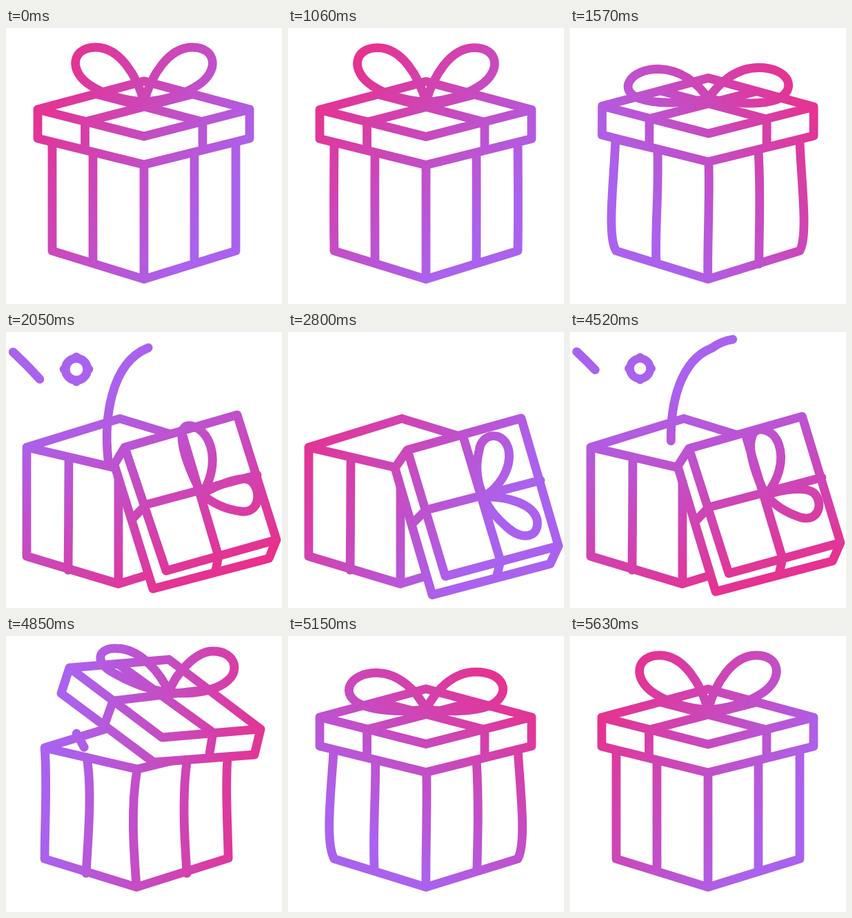
Write an HTML page without scripts that moves like this. It is 400 px wide and 400 px high and loops after 5.66 s.

```html
<!DOCTYPE html>
<html lang="en">
<head>
<meta charset="utf-8">
<title>Gift box</title>
<style>
html, body { margin: 0; width: 100%; height: 100%; overflow: hidden; background: #fff; }
svg { display: block; width: 100%; height: 100%; }
.ink * {
  fill: none; stroke: #fff; stroke-width: 12.8; stroke-linecap: round; stroke-linejoin: round;
}
/* Opens, then plays backwards to close; the delay places the closed pause at load. */
.ink, .ink * {
  animation: 2830ms linear -5175ms infinite alternate both;
}
#box { animation-name: slide; }
#body { animation-name: body; }
#lid { fill: #000; animation-name: lid; }
#bow { animation-name: bow; }
#streak { animation-name: streak; }
#streamer { animation-name: streamer; }
#ring { animation-name: ring; }
#ring * { animation: none; }
#ring .nub { fill: #fff; stroke: none; }

@keyframes slide {
  0%, 38.3% { transform: translate(0, 0); }
  45.8% { transform: translate(-11px, 0); }
  55.3%, 100% { transform: translate(-37px, 1.5px); }
}

@keyframes body {
  0%, 18.2% {
    animation-timing-function: ease-in-out;
    d: path("M67 161L200 193L333 161L200 121Z M67 161C67 215 67 270 67 323L200 364L333 323C333 270 333 215 333 161 M200 193C200 250 200 310 200 364 M126 176C126 230 126 290 126 339 M273 176C273 230 273 290 273 339");
  }
  29.9% {
    animation-timing-function: ease-in-out;
    d: path("M67 167L200 199L333 167L200 127Z M67 167C61 220 53 290 67 323L200 364L333 323C347 290 339 220 333 167 M200 199C200 250 200 310 200 364 M126 182C123 235 121 290 126 339 M273 182C276 235 278 290 273 339");
  }
  38.3% {
    d: path("M66 161L201 193L334 161L200 121Z M66 161C64 220 53 302 67 323L200 364L333 323C346 302 335 220 333 161 M201 193C203 250 199 310 200 364 M127 176C129 240 123 290 125 340 M273 176C277 240 274 290 274 342");
  }
  45.8% {
    d: path("M67 162L201 193L333 161L200 121Z M67 162C71 215 67 270 67 323L200 364L333 322C332 270 328 215 333 161 M201 193C191 250 196 310 200 364 M128 176C136 225 130 290 127 344 M274 176C265 230 270 300 273 344");
  }
  55.3%, 100% {
    d: path("M67 165.5L200 196.5L333 164L202 124Z M67 165.5C67 215 67 270 67 323.5L200 363.5L333 323C333 270 333 215 333 164 M200 196.5C200 250 200 310 200 363.5 M128 181C128 230 127.5 290 127 343.5 M273 181C273 230 273 290 273 343");
  }
}

/* Every part of the lid runs clockwise so its fill stays solid. */
@keyframes lid {
  0%, 18.2% {
    animation-timing-function: ease-in-out;
    d: path("M46 118L200 77L353 118L353 160L200 198L46 160Z M353 118L200 157L46 118 M114.5 175L114.5 136L270 96 M132 96L285 136L285 175");
  }
  29.9% {
    animation-timing-function: ease-in-out;
    d: path("M46 126L200 85L353 126L353 168L200 206L46 168Z M353 126L200 165L46 126 M114.5 183L114.5 144L270 104 M132 104L285 144L285 183");
  }
  38.3% {
    animation-timing-function: cubic-bezier(.3, .4, .7, 1);
    d: path("M46 114L200 73L353 114L353 156L200 194L46 156Z M353 114L200 153L46 114 M114.5 171L114.5 132L270 92 M132 92L285 132L285 171");
  }
  45.8% {
    animation-timing-function: cubic-bezier(.4, .2, .7, .9);
    d: path("M92 46L236 34L369 135L360 172L214 183L80 83Z M369 135L226 147L92 46 M143 128L155 94L297 77 M163 41L300 140L295 170");
  }
  55.3% {
    animation-timing-function: ease-out;
    d: path("M172 167L335 120L392 301L381 328L213 372L157 192Z M392 301L232 346L172 167 M183 271L203 250L364 207 M254 143L308 325L304 345");
  }
  61.7%, 100% {
    d: path("M173 171L338 125L392 310L380 336L209 381L155 197Z M392 310L228 354L173 171 M183 275L200 258L366 215 M254 152L308 332L303 352");
  }
}

@keyframes bow {
  0%, 18.2% {
    animation-timing-function: ease-in-out;
    d: path("M200 107C190 70 165 28 130 28C95 28 90 62 122 83C145 98 175 105 200 107 M200 107C210 70 235 28 270 28C305 28 310 62 278 83C255 98 225 105 200 107");
  }
  29.9% {
    animation-timing-function: ease-in-out;
    d: path("M200 115C190 78 165 38 130 38C95 38 88 70 120 91C143 106 175 113 200 115 M200 115C210 78 235 38 270 38C305 38 312 70 280 91C257 106 225 113 200 115");
  }
  38.3% {
    animation-timing-function: cubic-bezier(.3, .4, .7, 1);
    d: path("M200 103C185 80 160 61 128 60C85 60 68 92 100 103C130 113 170 108 200 103 M200 103C215 80 240 58 273 58C318 58 330 90 300 104C272 114 230 108 200 103");
  }
  45.8% {
    animation-timing-function: cubic-bezier(.4, .2, .7, .9);
    d: path("M236 82C225 55 195 18 160 18C135 17 128 35 150 50C175 65 205 78 236 82 M236 82C245 55 275 22 300 22C330 22 340 48 322 64C305 80 270 85 236 82");
  }
  55.3% {
    animation-timing-function: cubic-bezier(.3, 1.5, .6, 1);
    d: path("M284 235C300 210 304 180 293 157C283 137 262 130 257 140C248 160 270 210 284 235 M284 235C305 222 335 210 350 213C369 219 373 262 342 260C315 257 298 247 284 235");
  }
  81.8%, 100% {
    d: path("M284 239C305 225 324 200 320 172C314 142 280 145 277 172C271 195 274 220 284 239 M284 239C315 238 355 248 361 272C365 298 340 302 320 285C300 268 290 255 284 239");
  }
}

/* Confetti: dashes that run along their paths. */
@keyframes streak {
  0%, 43.6% { opacity: 0; stroke-dasharray: .1 200; stroke-dashoffset: 0; }
  43.7% { opacity: 1; stroke-dasharray: .1 200; stroke-dashoffset: 0; }
  45.8% { stroke-dasharray: 12 200; stroke-dashoffset: -14; }
  55.3% { stroke-dasharray: 28 200; stroke-dashoffset: -70.5; }
  61.7% { opacity: 1; stroke-dasharray: .1 200; stroke-dashoffset: -99.5; }
  61.8%, 100% { opacity: 0; stroke-dasharray: .1 200; stroke-dashoffset: -99.5; }
}

@keyframes streamer {
  0%, 46.8% { opacity: 0; stroke-dasharray: .1 200; stroke-dashoffset: 0; }
  46.9% { opacity: 1; stroke-dasharray: .1 200; stroke-dashoffset: 0; }
  55.3% { stroke-dasharray: 54.5 200; stroke-dashoffset: 0; }
  64.8% { stroke-dasharray: 62 200; stroke-dashoffset: -37; animation-timing-function: ease-out; }
  78.6%, 81.2% { opacity: 1; stroke-dasharray: .1 200; stroke-dashoffset: -99.8; }
  81.3%, 100% { opacity: 0; stroke-dasharray: .1 200; stroke-dashoffset: -99.8; }
}

@keyframes ring {
  0%, 46.8% { transform: translate(135px, 155px) scale(0); animation-timing-function: ease-out; }
  55.3% { transform: translate(102px, 54px) scale(1); animation-timing-function: ease-in; }
  64.8%, 100% { transform: translate(96px, 40px) scale(0); }
}
</style>
</head>
<body>
<svg viewBox="0 0 400 400">
  <defs>
    <linearGradient id="tint" gradientUnits="userSpaceOnUse" x1="390" y1="200" x2="75" y2="200">
      <stop offset="0" stop-color="#e8308c"/>
      <stop offset="1" stop-color="#aa62ee"/>
      <animateTransform attributeName="gradientTransform" type="rotate" dur="5.66s" repeatCount="indefinite"
        values="-148 200 200;-148 200 200;212 200 200;212 200 200;-148 200 200;-148 200 200"
        keyTimes="0;.1767;.4947;.6767;.9947;1"/>
    </linearGradient>
    <mask id="art" maskUnits="userSpaceOnUse" x="0" y="0" width="400" height="400">
      <g class="ink">
        <g id="box"><path id="body"/></g>
        <path id="streak" pathLength="100" d="M125 185C108 150 82 95 8 27"/>
        <path id="streamer" pathLength="100" d="M148 185C142 130 150 45 206 23C240 -2 300 5 319 81"/>
        <g id="ring">
          <circle r="15.8"/>
          <circle class="nub" cx="18" r="6.3"/>
          <circle class="nub" cx="-18" r="6.3"/>
          <circle class="nub" cy="18" r="6.3"/>
          <circle class="nub" cy="-18" r="6.3"/>
        </g>
        <path id="lid"/>
        <path id="bow"/>
      </g>
    </mask>
  </defs>
  <rect width="400" height="400" fill="url(#tint)" mask="url(#art)"/>
</svg>
</body>
</html>
```
